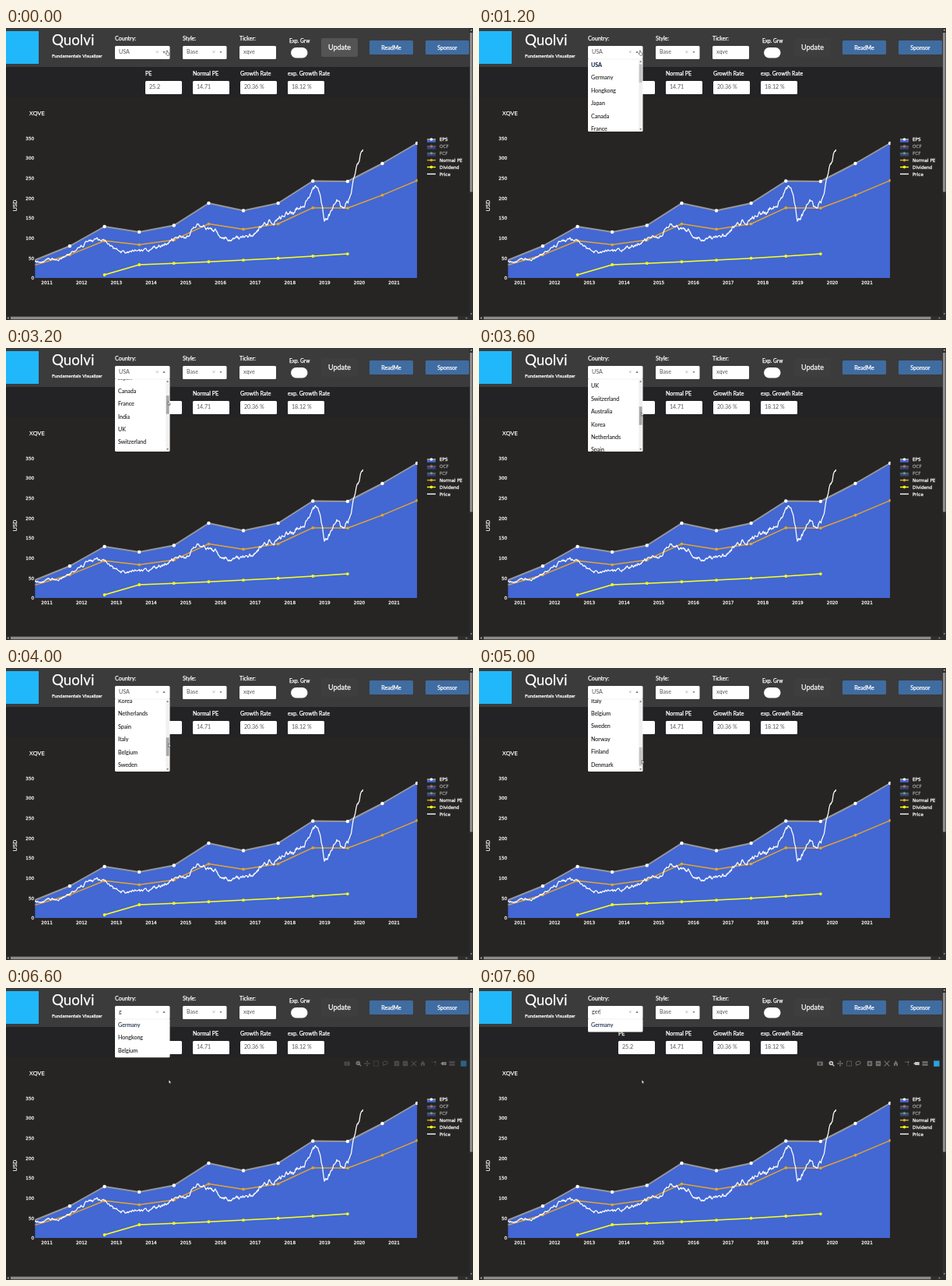
Write an HTML page with a canvas that moves like this. It is 600 px wide and 375 px high and loops after 8000 ms.

```html
<!DOCTYPE html>
<html lang="en">
<head>
<meta charset="utf-8">
<title>Fundamentals dashboard</title>
<style>
html, body { margin: 0; width: 100%; height: 100%; overflow: hidden; background: #262524; }
canvas { display: block; width: 600px; height: 375px; }
</style>
</head>
<body>
<canvas id="stage"></canvas>
<script>
const LOOP = 8000, STEP = 200;
const UI = 'Lato, sans-serif', PLOT = '"DejaVu Sans", sans-serif', TITLE = '"Open Sans", sans-serif';
const PAGE = '#262524', BLUE = '#4367d3', GRAY = '#979797', ORANGE = '#e2a42f', YELLOW = '#ffff1c';
const canvas = document.getElementById('stage');
const ratio = window.devicePixelRatio || 1;
canvas.width = 600 * ratio;
canvas.height = 375 * ratio;
const stage = canvas.getContext('2d');
let c = stage;

// ---------- helpers ----------
const clamp = (v, lo, hi) => Math.min(hi, Math.max(lo, v));
const ramp = (t, t0, t1) => clamp((t - t0) / (t1 - t0), 0, 1);

function rect(x, y, w, h, fill, r = 0) {
  c.fillStyle = fill;
  c.beginPath();
  c.roundRect(x, y, w, h, r);
  c.fill();
}
// "heft" thickens the glyphs a little, as small light text does on a dark page.
function text(str, x, y, size, color, { font = UI, weight = 400, align = 'left', heft = 0.25 } = {}) {
  c.font = `${weight} ${size}px ${font}`;
  c.textAlign = align;
  c.fillStyle = c.strokeStyle = color;
  c.lineWidth = heft;
  c.fillText(str, x, y);
  if (heft) c.strokeText(str, x, y);
}
function trace(points, close) {
  c.beginPath();
  points.forEach(([x, y]) => c.lineTo(x, y));
  if (close) c.closePath();
}
function poly(points, fill) {
  trace(points, true);
  c.fillStyle = fill;
  c.fill();
}
function line(points, color, width = 1, dash = []) {
  trace(points);
  c.setLineDash(dash);
  c.strokeStyle = color;
  c.lineWidth = width;
  c.stroke();
  c.setLineDash([]);
}
function dot(x, y, r, fill) {
  c.fillStyle = fill;
  c.beginPath();
  c.arc(x, y, r, 0, 7);
  c.fill();
}
function triangle(x, y, size, fill, angle = 0) {
  const corner = k => [x + size * Math.sin(angle + k * 2.094), y + size * Math.cos(angle + k * 2.094)];
  poly([0, 1, 2].map(corner), fill);
}
function cross(x, y, s, color, width = 0.6) {
  line([[x - s, y - s], [x + s, y + s]], color, width);
  line([[x + s, y - s], [x - s, y + s]], color, width);
}
function plus(x, y, s, color, width = 0.9) {
  line([[x - s, y], [x + s, y]], color, width);
  line([[x, y - s], [x, y + s]], color, width);
}

// ---------- chart data ----------
const BASE = 321, yearX = i => 37.3 + i * 44.62;
const earnings = [23, 41, 66, 59, 67.5, 96, 86.5, 96, 124.5, 124, 147, 173];
const series = (heights, first = 0) => heights.map((h, i) => [yearX(i + first), BASE - h]);
const eps = series(earnings);
const normalPe = series(earnings.map(h => h * 0.7235));
const dividend = series(Array.from({ length: 8 }, (_, i) => i ? 17 * 1.105 ** (i - 1) : 4), 2);

// Price: a wandering line around a few turning points.
function priceLine() {
  const turns = [[37, 301], [80, 294], [107, 272], [126, 273], [141, 288], [175, 288], [229, 267],
    [250, 254], [275, 265], [297, 266], [312, 269], [330, 252], [370, 236], [388, 219], [397, 204],
    [403, 217], [409, 247], [426, 224], [430, 233], [440, 220], [452, 177], [459, 153]];
  let seed = 17, drift = 0, k = 0;
  const random = () => (seed = seed * 16807 % 2147483647) / 2147483647 - 0.5;
  const points = [];
  for (let x = 37; x < 459; x += 0.8) {
    if (x > turns[k + 1][0]) k++;
    const [[x0, y0], [x1, y1]] = turns.slice(k, k + 2);
    const swing = 2 + x / 110;
    drift = drift * 0.84 + random() * swing;
    points.push([x, y0 + (y1 - y0) * ramp(x, x0, x1) + drift]);
  }
  return points;
}

// ---------- static page ----------
function field(x, y, w, value) {
  rect(x, y, w, 17, '#fff', 1.5);
  text(value, x + 5, y + 10.2, 7.1, '#555', { heft: 0 });
}
function button(x, label) {
  rect(x, 16, 56, 18, '#3f6ca1', 1.5);
  text(label, x + 28, 27.6, 7.1, '#fff', { align: 'center' });
}
function header() {
  rect(0, 0, 600, 50, '#3c3b3c');
  rect(0, 50, 600, 40, '#232325');
  rect(0, 4, 42, 42, '#20b8fb');
  text('Quolvi', 59, 21.8, 18.7, '#fff');
  text('Fundamentals Visualizer', 59, 38, 6.1, '#fff');
  text('Country:', 140, 16.3, 7.1, '#fff');
  text('Style:', 227, 16.3, 7.1, '#fff');
  text('Ticker:', 300, 16.3, 7.1, '#fff');
  text('Exp. Grw', 364, 19, 6.6, '#fff');
  field(140, 23, 70.5, '');
  field(227, 23, 56.5, 'Base');
  cross(267, 30.7, 1.3, '#999');
  triangle(276, 30.8, 1.8, '#888');
  field(300, 23, 47, 'xqve');
  rect(366, 25, 21.5, 13.5, '#fff', 6.7);
  button(467, 'ReadMe');
  button(539, 'Sponsor');
  const facts = { 'PE': '25.2', 'Normal PE': '14.71', 'Growth Rate': '20.36 %', 'exp. Growth Rate': '18.12 %' };
  Object.entries(facts).forEach(([label, value], i) => {
    text(label, 179 + i * 61, 61.2, 7.1, '#fff');
    field(179 + i * 61, 68, 47, value);
  });
}
function legend() {
  const rows = [['EPS', GRAY, '#fff'], ['OCF', '#977764', '#d99a6a'], ['FCF', '#7c8f83', '#9cc4a8'],
    ['Normal PE', ORANGE], ['Dividend', YELLOW], ['Price', '#fff']];
  rows.forEach(([label, color, mark = color], i) => {
    const y = 143 + i * 8.9;
    c.globalAlpha = i === 1 || i === 2 ? 0.5 : 1;
    if (i < 3) rect(541, y, 11, 3.8, BLUE);
    line([[541, y], [552, y]], color, i < 3 ? 1.9 : 1.4);
    if (i < 5) dot(546.5, y, 1.8, mark);
    text(label, 557, y + 2, 5.7, '#fff', { font: PLOT });
    c.globalAlpha = 1;
  });
}
function curve(points, color, width, mark, radius) {
  line(points, color, width);
  points.filter(([x]) => x > 40).forEach(([x, y]) => dot(x, y, radius, mark));
}
function chart() {
  text('XQVE', 30, 112.3, 8, '#fff', { font: TITLE });
  c.save();
  c.beginPath();
  c.rect(37, 130, 491.6, 191);
  c.clip();
  poly([...eps, [yearX(11), BASE], [yearX(0), BASE]], BLUE);
  curve(eps, GRAY, 2, '#fff', 2.2);
  curve(normalPe, ORANGE, 1.5, ORANGE, 1.9);
  curve(dividend, YELLOW, 1.5, YELLOW, 1.9);
  line(priceLine(), '#fff', 1.25);
  c.restore();
  for (let v = 0; v <= 350; v += 50)
    text(v, 36.2, 323.2 - v * 0.513, 5.7, '#fff', { font: PLOT, align: 'right' });
  for (let i = 0; i < 11; i++)
    text(2011 + i, 52.6 + i * 44.6, 329, 5.7, '#fff', { font: PLOT, align: 'center' });
  c.save();
  c.translate(13.5, 228);
  c.rotate(-Math.PI / 2);
  text('USD', 0, 0, 7.4, '#fff', { font: TITLE, align: 'center' });
  c.restore();
  legend();
}
function pageScrollbars() {
  rect(595.5, 0, 4.5, 370, '#2d2d2d');
  rect(596, 6, 3.4, 204.5, '#8c8c8c');
  triangle(597.8, 2.8, 1.5, '#ccc', Math.PI);
  triangle(597.8, 367, 1.5, '#999');
  rect(0, 370, 600, 5, '#2d2d2d');
  rect(6, 370.8, 574.5, 3.4, '#8c8c8c');
  triangle(2.8, 372.5, 1.5, '#ccc', -Math.PI / 2);
  triangle(591.5, 372.5, 1.5, '#999', Math.PI / 2);
}
function renderPage() {
  const page = document.createElement('canvas');
  page.width = canvas.width;
  page.height = canvas.height;
  c = page.getContext('2d');
  c.scale(ratio, ratio);
  c.lineJoin = 'round';
  rect(0, 0, 600, 375, PAGE);
  header();
  chart();
  pageScrollbars();
  c = stage;
  return page;
}

// ---------- moving parts ----------
const ROW = 16.4, LIST_TOP = 40, LIST_HEIGHT = 93, TRACK = 79;
const DRAG_START = 2800, DRAG_END = 4600, GRIP_Y = 54, DRAG_LENGTH = 64;
const countries = ['USA', 'Germany', 'Hongkong', 'Japan', 'Canada', 'France', 'India', 'UK', 'Switzerland',
  'Australia', 'Korea', 'Netherlands', 'Spain', 'Italy', 'Belgium', 'Sweden', 'Norway', 'Finland', 'Denmark'];

const dragged = t => DRAG_LENGTH * ramp(t, DRAG_START - 15, DRAG_END);

function menu(t, query) {
  const items = countries.filter(name => name.toLowerCase().includes(query));
  const content = items.length * ROW, height = Math.min(content, LIST_HEIGHT);
  const scroll = query ? 0 : Math.min(dragged(t) * content / TRACK, content - height);
  rect(140, LIST_TOP, 70.5, height, '#fff', [0, 0, 1.5, 1.5]);
  c.save();
  c.beginPath();
  c.rect(140, LIST_TOP, 70, height);
  c.clip();
  items.forEach((name, i) => {
    const selected = name === 'USA', focused = query && i === 0;
    text(name, 144, 50 + i * ROW - scroll, 7.1, selected || focused ? '#17294a' : '#222',
      { weight: selected ? 700 : 400, heft: 0.1 });
  });
  c.restore();
  rect(140, 39.8, 70, 0.4, '#e4e4e4');
  if (query) return;
  const held = t >= DRAG_START && t < 5000;
  rect(205.3, 40.3, 4.7, 92, '#f1f1f1');
  rect(205.7, 46.5 + scroll * TRACK / content, 3.9, TRACK * height / content, held ? '#a8a8a8' : '#c4c4c4');
  triangle(207.6, 43.3, 1.5, '#777', Math.PI);
  triangle(207.6, 129.8, 1.5, '#777');
}
function countryBox(t, open, query) {
  text(query || 'USA', 145, 33.2, 7.1, query ? '#333' : '#555', { heft: 0 });
  const caretOn = [[4600, 5000], [5400, 6000], [7600, LOOP]].some(([from, to]) => t >= from && t < to);
  if (caretOn) rect(145 + (query ? c.measureText(query).width : 0), 27, 0.5, 7, '#444');
  cross(194.3, 30.7, 1.3, '#999');
  triangle(203, 31, 1.8, '#777', open ? Math.PI : 0);
}
function cursor(t) {
  const hand = [[-0.8, -1], [0.5, -1], [0.6, 1.2], [2.7, 2], [2.4, 5.2], [0, 5.4], [-2.2, 2.6], [-0.7, 2.8]];
  const arrow = [[0, 0], [0, 4.6], [1, 3.7], [1.7, 5.2], [2.5, 4.8], [1.8, 3.4], [3.2, 3.3]];
  c.save();
  c.translate(207 + 2.2 * ramp(t, 1400, DRAG_END), 30 + (GRIP_Y - 30) * ramp(t, 1400, 2400) + dragged(t));
  poly(t < 1600 ? hand : arrow, '#fff');
  c.strokeStyle = '#222';
  c.lineWidth = 0.5;
  c.stroke();
  c.restore();
}
function modebar(alpha) {
  const dim = '#727170', lit = '#c4c4c4', y = 97;
  c.globalAlpha = alpha;
  // Camera and magnifier
  rect(434.5, y - 2.4, 7.4, 5.2, dim, 0.8);
  dot(438.2, y + 0.2, 1.6, PAGE);
  dot(438.2, y + 0.2, 0.8, dim);
  dot(452.4, y - 0.5, 2.8, lit);
  line([[454, y + 1], [456.3, y + 3.3]], lit, 1.3);
  plus(452.4, y - 0.5, 1.4, PAGE, 0.7);
  // Pan, box select and lasso
  plus(464, y, 3, dim);
  for (let a = 0; a < 4; a++)
    triangle(464 + 2.8 * Math.sin(a * Math.PI / 2), y + 2.8 * Math.cos(a * Math.PI / 2), 1.4, dim, a * Math.PI / 2);
  line([[472.6, y - 3], [478.6, y - 3], [478.6, y + 3], [472.6, y + 3], [472.6, y - 3]], dim, 1, [1.4, 0.8]);
  c.beginPath();
  c.ellipse(487.2, y - 0.7, 3.2, 2.2, -0.3, 0, 7);
  c.stroke();
  line([[485, y + 1], [484.5, y + 3.3]], dim, 0.9);
  // Zoom in, zoom out, autoscale and home
  rect(498.8, y - 3.2, 6.4, 6.4, dim, 0.6);
  plus(502, y, 2, PAGE);
  rect(509.8, y - 3.2, 6.4, 6.4, dim, 0.6);
  line([[511, y], [515, y]], PAGE, 0.9);
  cross(524, y, 3.3, dim, 1.1);
  triangle(535.5, y - 0.8, 3.3, dim, Math.PI);
  rect(533, y, 1.9, 3, dim);
  rect(536.1, y, 1.9, 3, dim);
  // Spikes, hover tags and badge
  line([[547, y - 2], [551.5, y - 2], [551.5, y + 3.5]], dim, 0.9, [1.2, 0.8]);
  dot(551.5, y - 2, 1.1, dim);
  rect(560, y - 2, 5.8, 4, lit);
  triangle(560, y, 2, lit, -Math.PI / 2);
  rect(569.5, y - 2.9, 7.2, 2.4, dim);
  rect(569.5, y + 0.4, 7.2, 2.4, dim);
  rect(584.2, y - 3.6, 7.4, 7.4, '#2f9fe0');
  c.globalAlpha = 1;
}

const page = renderPage();

function draw(now) {
  const t = Math.floor(now % LOOP / STEP) * STEP;
  const open = t >= 1200;
  const query = t < 6400 ? '' : t < 6800 ? 'g' : t < 7000 ? 'ge' : 'ger';
  c.setTransform(1, 0, 0, 1, 0, 0);
  c.drawImage(page, 0, 0);
  c.setTransform(ratio, 0, 0, ratio, 0, 0);
  rect(405, 13, 47, 24, open ? '#3f3e3f' : '#545454', 2);
  text('Update', 428.5, 28.3, 9, '#fff', { align: 'center' });
  countryBox(t, open, query);
  if (open) menu(t, query);
  if (t >= 6600) modebar(ramp(t, 6400, 6800));
  cursor(t);
}

const start = performance.now();
function tick() {
  draw(performance.now() - start);
  requestAnimationFrame(tick);
}
tick();
</script>
</body>
</html>
```
